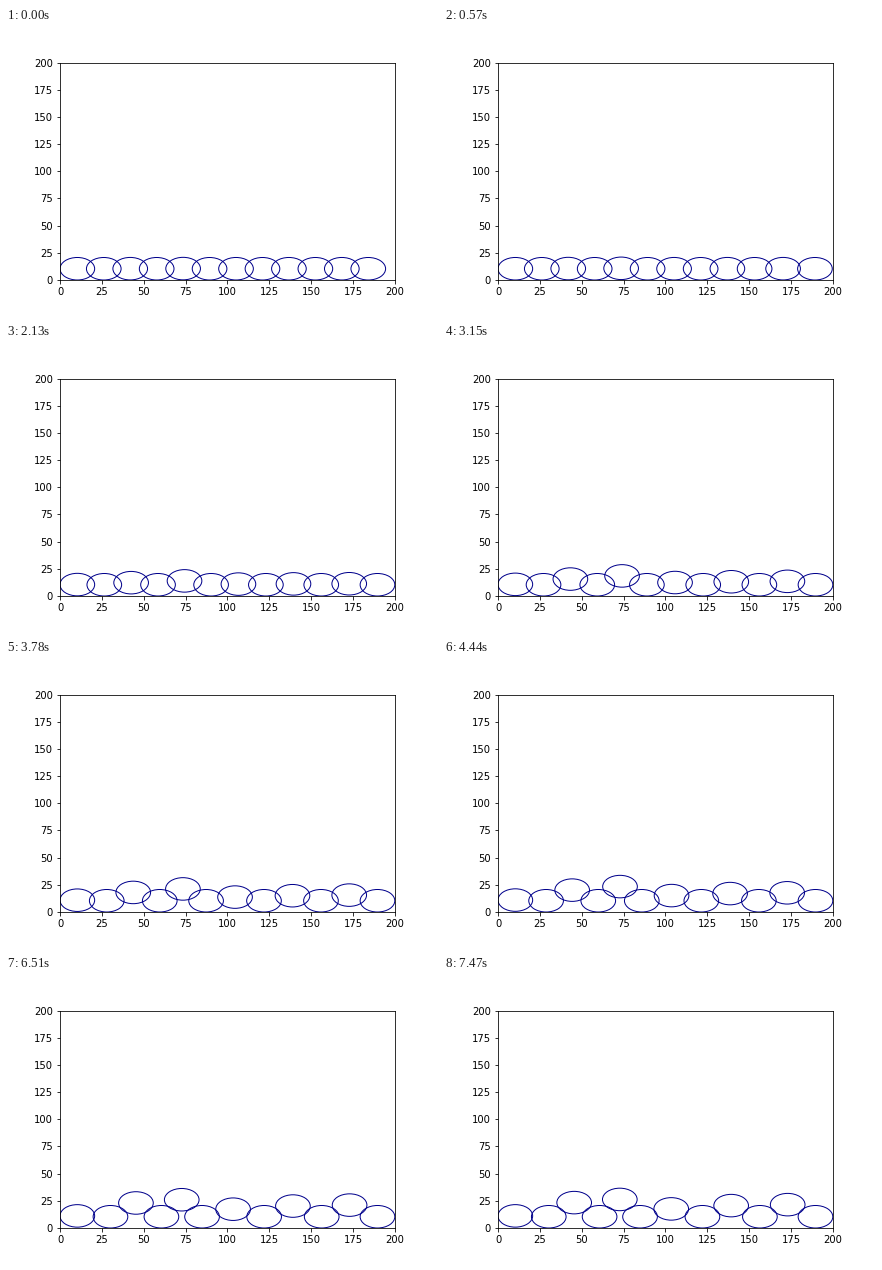
Animation of 432 by 288 pixels, one loop 7500 ms. Source, as a matplotlib script:

```python
import numpy as np
import matplotlib.pyplot as plt
from matplotlib.animation import FuncAnimation
from matplotlib.patches import Circle

FRAMES, STEP = 250, 0.03
R, SIZE, GAP, COUNT = 10.35, 200, 15.8, 12
SLACK = SIZE - 2 * R - GAP * (COUNT - 1)

# Balls squeezed upwards: final height and time of the main rise in seconds.
RISERS = {0: (0.8, 2.4), 2: (13.2, 2.62), 4: (16.1, 2.25),
          6: (7.4, 3.05), 8: (10.5, 3.1), 10: (11.4, 3.05)}


def heights(t):
    lift = np.zeros(COUNT)
    for i, (top, mid) in RISERS.items():
        lift[i] = top / (1 + np.exp(mid - t)) ** 2
    return lift


def pose(t):
    """Ball centres: a chain of equal links that fills the span at time t."""
    lift = heights(t)
    push = SLACK * (1 - np.exp(-t / 0.2))
    span = GAP * (COUNT - 1) + push

    # The free end spreads first; the slack then travels back along the chain.
    q = 1 - np.exp(-t / 1.2)
    extra = push * (1 - q) * q ** np.arange(COUNT - 2, -1, -1)

    link = 20.0
    for _ in range(12):
        gaps = np.sqrt((link + extra) ** 2 - np.diff(lift) ** 2)
        link += (span - gaps.sum()) / (COUNT - 1)
    x = R + np.concatenate([[0], np.cumsum(gaps)])
    return x, R + lift


plt.rcParams.update({"font.family": "DejaVu Sans", "text.kerning_factor": 6})
fig, ax = plt.subplots(figsize=(6, 4), dpi=72, facecolor="white")
fig.subplots_adjust(left=0.125, right=0.9, bottom=0.125, top=0.88)
ax.set(xlim=(0, SIZE), ylim=(0, SIZE),
       xticks=range(0, SIZE + 1, 25), yticks=range(0, SIZE + 1, 25))

balls = [ax.add_patch(Circle((0, 0), R, fill=False, edgecolor="darkblue", lw=1))
         for _ in range(COUNT)]


def update(n):
    for ball, x, y in zip(balls, *pose(n * STEP)):
        ball.center = x, y
    return balls


anim = FuncAnimation(fig, update, frames=FRAMES, interval=30,
                     repeat=True, repeat_delay=0, blit=False)
plt.show()
```
